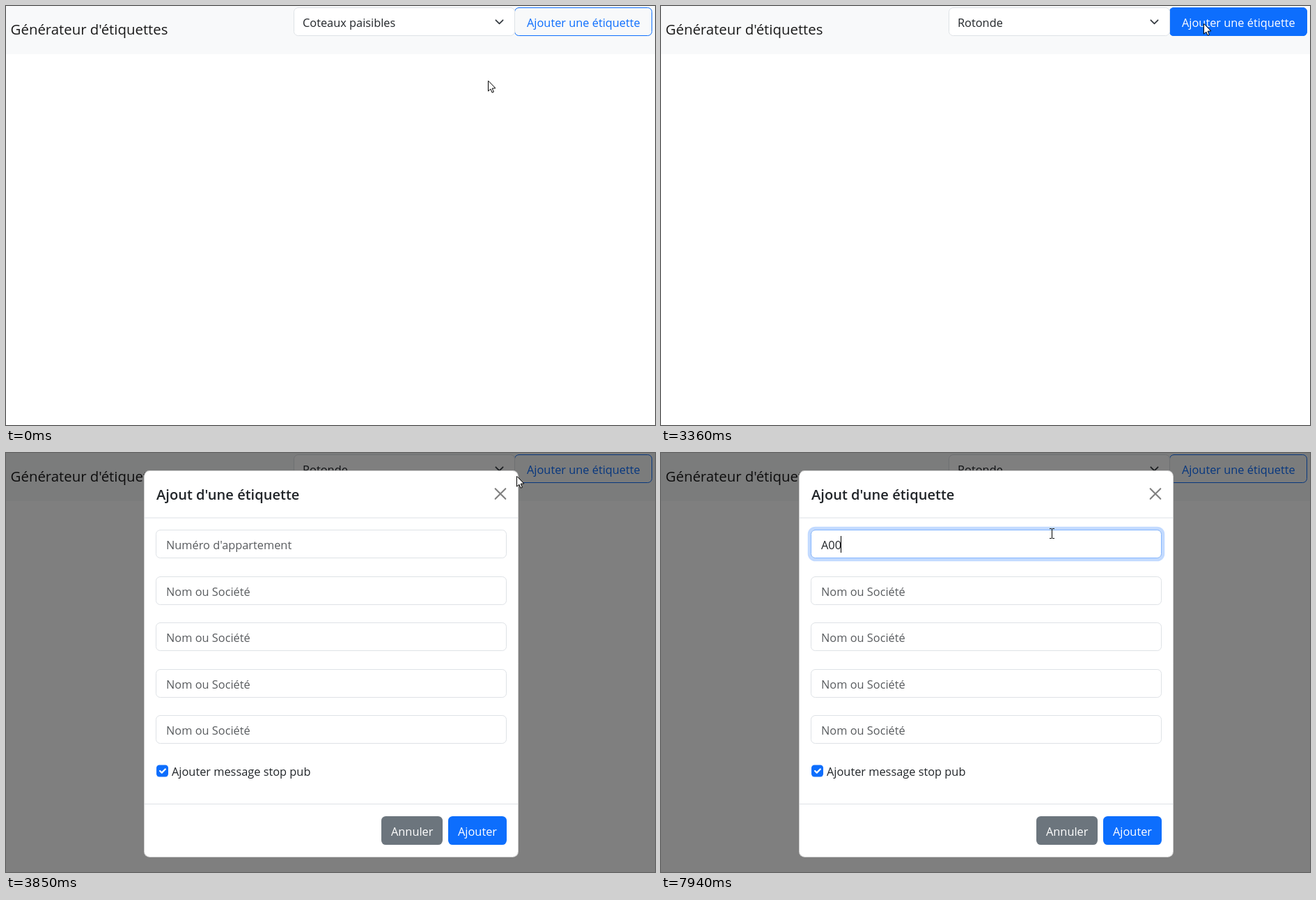
Animation, 932 px wide and 601 px high, one loop 8000 ms. Source, as an HTML page with a canvas:

```html
<!DOCTYPE html>
<html lang="fr">
<head>
<meta charset="utf-8">
<title>Générateur d'étiquettes</title>
<style>
html, body { margin: 0; width: 100%; height: 100%; overflow: hidden; background: #fff; }
canvas { display: block; }
</style>
</head>
<body>
<canvas id="stage" width="932" height="601"></canvas>
<script>
const W = 932, H = 601, LOOP = 8000, STEP = 70;
const stage = document.getElementById('stage').getContext('2d');
const layer = document.createElement('canvas');
layer.width = W;
layer.height = H;
const modalCtx = layer.getContext('2d');
let ctx = stage;

const FAMILY = '"Open Sans", "Noto Sans", sans-serif';
const BODY = `16.35px ${FAMILY}`;
const BRAND = `20.4px ${FAMILY}`;
const HEADING = `600 20.1px ${FAMILY}`;
const INK = '#212529', BLUE = '#0d6efd', LINE = '#dee2e6', HINT = '#595c5f';
const OPTIONS = ['Rotonde', 'Coteaux paisibles'];

// Pointer path: time, x, y
const PATH = [
  [70, 692, 107], [560, 690, 22], [950, 690, 22], [1440, 657, 58],
  [2170, 657, 58], [2950, 779, 25], [3640, 779, 25], [3990, 708, 38],
  [4340, 580, 100], [4550, 550, 119], [4820, 556, 109], [5030, 561, 115]
];

const clamp = v => Math.max(0, Math.min(1, v));
const mix = (a, b, p) => a + (b - a) * p;
const fade = (t, start, length = 150) => clamp((t - start) / length);
const within = (t, a, b) => t >= a && t < b;

// The screen refreshes every 70 ms while something moves
function snap(t) {
  const start = [3220, 2170, 950, 70].find(s => t >= s);
  return start === undefined ? 0 : start + Math.floor((t - start) / STEP) * STEP;
}

function easeOut(x) {
  let lo = 0, hi = 1;
  for (let i = 0; i < 20; i++) {
    const u = (lo + hi) / 2;
    if (3 * (1 - u) * u * u * 0.58 + u ** 3 < x) lo = u; else hi = u;
  }
  return 3 * (1 - lo) * lo * lo + lo ** 3;
}

function pointerAt(t) {
  const i = PATH.findIndex(k => k[0] > t);
  if (i === 0) return PATH[0].slice(1);
  if (i < 0) return PATH[PATH.length - 1].slice(1);
  const [t0, x0, y0] = PATH[i - 1], [t1, x1, y1] = PATH[i];
  const p = (t - t0) / (t1 - t0), e = p * p * (3 - 2 * p);
  return [Math.round(mix(x0, x1, e)), Math.round(mix(y0, y1, e))];
}

function text(str, x, y, color = INK, font = BODY) {
  ctx.font = font;
  ctx.fillStyle = color;
  ctx.fillText(str, x, y);
}

function rect(x, y, w, h, color) {
  ctx.fillStyle = color;
  ctx.fillRect(x, y, w, h);
}

function box(x, y, w, h, r, fill, border) {
  if (fill) {
    ctx.beginPath();
    ctx.roundRect(x, y, w, h, r);
    ctx.fillStyle = fill;
    ctx.fill();
  }
  if (border) {
    ctx.beginPath();
    ctx.roundRect(x + 0.5, y + 0.5, w - 1, h - 1, r - 0.5);
    ctx.strokeStyle = border;
    ctx.lineWidth = 1;
    ctx.stroke();
  }
}

function line(points, color, width) {
  ctx.beginPath();
  points.forEach(([x, y]) => ctx.lineTo(x, y));
  ctx.strokeStyle = color;
  ctx.lineWidth = width;
  ctx.lineCap = 'round';
  ctx.lineJoin = 'round';
  ctx.stroke();
}

function field(x, y, w, h, focus) {
  box(x, y, w, h, 6.4, '#fff', LINE);
  if (focus <= 0) return;
  ctx.save();
  ctx.globalAlpha *= focus;
  box(x, y, w, h, 6.4, null, '#86b7fe');
  const g = 4.27;
  ctx.beginPath();
  ctx.roundRect(x - g, y - g, w + 2 * g, h + 2 * g, 6.4 + g);
  ctx.roundRect(x, y, w, h, 6.4);
  ctx.fillStyle = 'rgba(13,110,253,0.25)';
  ctx.fill('evenodd');
  ctx.restore();
}

function page(t, s) {
  rect(0, 0, W, H, '#fff');
  rect(0, 0, W, 69, '#f8f9fa');
  text("Générateur d'étiquettes", 6.6, 41, 'rgba(0,0,0,0.9)', BRAND);

  const hover = fade(s, 2620) - fade(s, 3360);
  box(730, 2, 198, 41, 6.4, `rgba(13,110,253,${hover})`, BLUE);
  const tint = [mix(13, 255, hover), mix(110, 255, hover), mix(253, 255, hover)];
  text('Ajouter une étiquette', 748, 30, `rgb(${tint.map(Math.round)})`);

  field(413, 2, 318, 41, fade(s, 500) - fade(s, 3200));
  text(OPTIONS[t < 1770 ? 1 : 0], 426, 30);
  line([[703.4, 20.3], [708.5, 25.4], [713.6, 20.3]], '#343a40', 1.75);
}

function popup(active) {
  ctx.save();
  ctx.shadowColor = 'rgba(0,0,0,0.24)';
  ctx.shadowBlur = 50;
  ctx.shadowOffsetY = 26;
  box(413, 46, 317, 51, 7, '#fff');
  ctx.restore();
  ctx.save();
  ctx.beginPath();
  ctx.roundRect(413, 46, 317, 51, 7);
  ctx.clip();
  rect(413, active ? 72 : 47, 317, 25, '#767676');
  ctx.restore();
  box(413, 46, 317, 51, 7, null, 'rgba(0,0,0,0.28)');
  OPTIONS.forEach((name, i) => text(name, 426, 66 + 24.5 * i, i === active ? '#fff' : INK));
}

function modal(t, s) {
  box(198, 25, 538, 555, 8.5, '#fff', 'rgba(0,0,0,0.18)');
  text("Ajout d'une étiquette", 216, 67, INK, HEADING);
  line([[702.7, 51.2], [717.3, 65.8]], '#7f7f7f', 2.1);
  line([[717.3, 51.2], [702.7, 65.8]], '#7f7f7f', 2.1);
  rect(199, 92.5, 536, 1, LINE);
  rect(199, 503, 536, 1, LINE);

  for (let i = 0; i < 5; i++) {
    const top = Math.floor(110.6 + 66.5 * i);
    field(215, top, 504, 41, i ? 0 : fade(s, 4870));
    if (i) text('Nom ou Société', 230, top + 28, HINT);
  }
  entry(t);

  box(216, 447.5, 17, 17, 4.2, BLUE);
  line([[221.1, 456], [223.7, 458.6], [228.8, 453.5]], '#fff', 2.3);
  text('Ajouter message stop pub', 238, 463);
  box(539, 521, 88, 41, 6.4, '#6c757d');
  text('Annuler', 553, 549, '#fff');
  box(635, 521, 84, 41, 6.4, BLUE);
  text('Ajouter', 649, 549, '#fff');
}

function entry(t) {
  const typed = 'A00'.slice(0, [6010, 6350, 7940].filter(k => t >= k).length);
  if (typed) text(typed, 230, 138);
  else text("Numéro d'appartement", 230, 138, HINT);
  const blinkOff = within(t, 5360, 5950) || within(t, 6950, 7410);
  if (t < 4890 || blinkOff) return;
  ctx.font = BODY;
  rect(Math.floor(229.9 + ctx.measureText(typed).width), 119, 1, 24, '#000');
}

function arrow(x, y) {
  ctx.beginPath();
  [[0, 0], [0, 14.6], [3.4, 11.6], [5.6, 16.7], [7.9, 15.7], [5.7, 10.7], [10, 10.4]]
    .forEach(([dx, dy]) => ctx.lineTo(x + 0.5 + dx, y + 0.5 + dy));
  ctx.closePath();
  ctx.fillStyle = '#fff';
  ctx.fill();
  ctx.strokeStyle = '#000';
  ctx.lineWidth = 1;
  ctx.lineJoin = 'miter';
  ctx.stroke();
}

function beam(x, y) {
  rect(x, y - 6, 1, 13, '#000');
  [y - 7, y + 7].forEach(v => {
    rect(x - 3, v, 3, 1, '#000');
    rect(x + 1, v, 3, 1, '#000');
  });
}

function draw(t) {
  const s = snap(t);
  const [px, py] = pointerAt(s);
  ctx = stage;
  page(t, s);
  if (within(t, 610, 1770)) popup(py >= 47 ? 0 : 1);

  const dim = fade(s, 3367) * 0.5;
  if (dim) rect(0, 0, W, H, `rgba(0,0,0,${dim})`);

  const shown = fade(s, 3523);
  if (shown) {
    ctx = modalCtx;
    ctx.clearRect(0, 0, W, H);
    ctx.save();
    ctx.translate(0, -Math.round(53.3 * (1 - easeOut(fade(s, 3523, 300)))));
    modal(t, s);
    ctx.restore();
    ctx = stage;
    ctx.globalAlpha = shown;
    ctx.drawImage(layer, 0, 0);
    ctx.globalAlpha = 1;
  }

  const overField = shown === 1 && within(px, 216, 719) && within(py, 106, 151);
  (overField ? beam : arrow)(px, py);
}

const origin = performance.now();
function tick() {
  draw((performance.now() - origin) % LOOP);
  requestAnimationFrame(tick);
}
tick();
</script>
</body>
</html>
```
